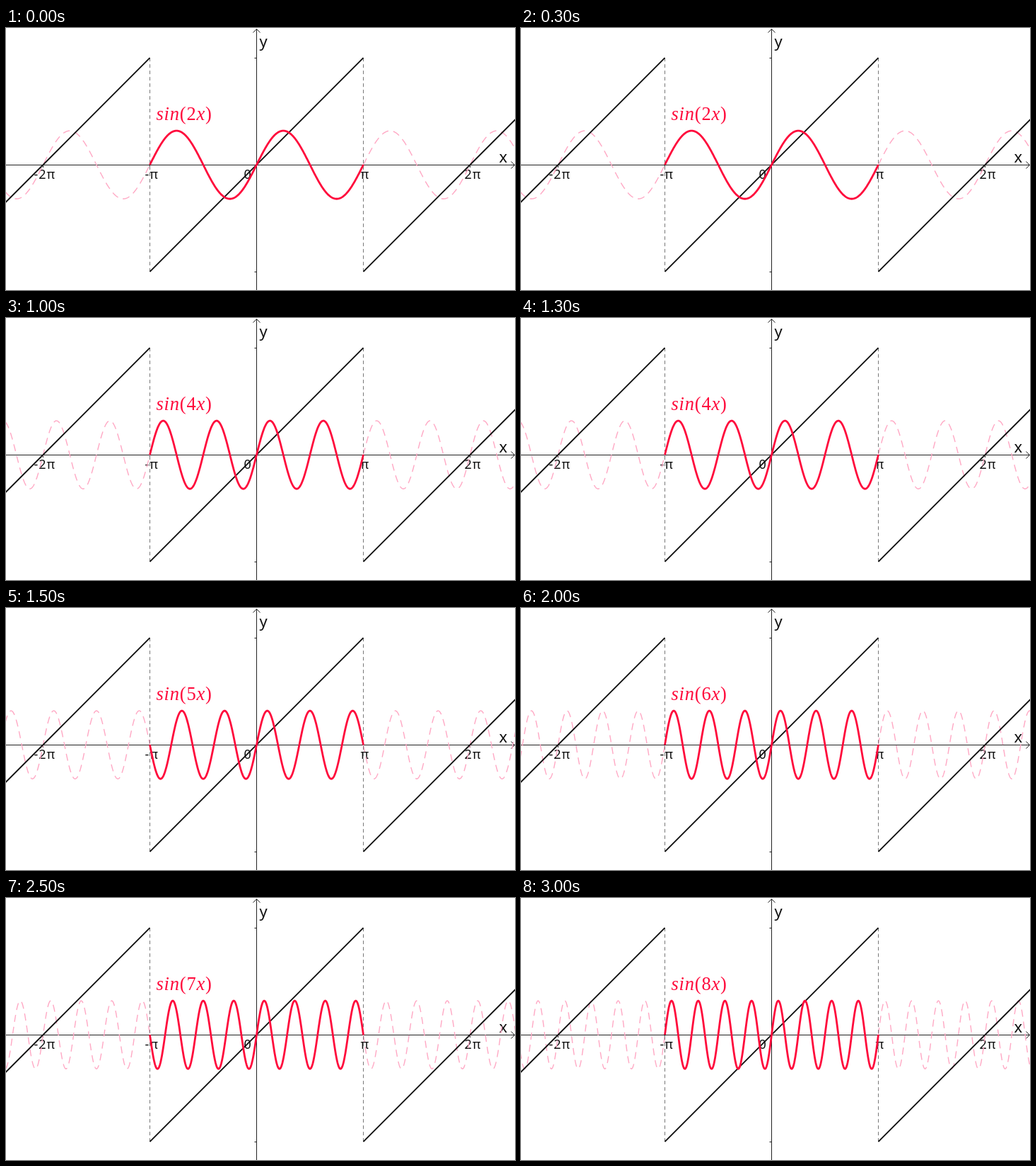
An HTML page with a canvas for the animation above (3500 ms loop, 720 px wide and 370 px high).

```html
<!DOCTYPE html>
<html lang="en">
<head>
<meta charset="utf-8">
<title>Sine harmonics on a sawtooth</title>
<style>
html, body { margin: 0; width: 100%; height: 100%; overflow: hidden; background: #fff; }
canvas { display: block; }
</style>
</head>
<body>
<canvas id="stage" width="720" height="370"></canvas>
<script>
const ctx = document.getElementById('stage').getContext('2d');
const W = 720, H = 370;
const OX = 354.5, OY = 193.2;   // origin
const HALF = 151;               // pixels per π
const UNIT = HALF / Math.PI;
const LEFT = OX - HALF, RIGHT = OX + HALF;
const RED = '#ff0a3c', PINK = '#ffa8c4';
const STEP_MS = 500, FIRST = 2, COUNT = 7;

function stroke(points, color, width, dash = []) {
  ctx.beginPath();
  points.forEach(([x, y]) => ctx.lineTo(x, y));
  ctx.strokeStyle = color;
  ctx.lineWidth = width;
  ctx.setLineDash(dash);
  ctx.stroke();
}

function label(text, x, y, font, color = '#111', spacing = 0) {
  ctx.font = font;
  ctx.fillStyle = color;
  ctx.letterSpacing = spacing + 'px';
  ctx.fillText(text, x, y);
  return x + ctx.measureText(text).width;
}

function drawAxes() {
  const ink = '#222';
  stroke([[0, 193.5], [719, 193.5]], ink, 1);
  stroke([[354.5, 2], [354.5, H]], ink, 1);
  stroke([[349.5, 6.5], [354.5, 1.5], [359.5, 6.5]], ink, 1);
  stroke([[714.5, 188.5], [719.5, 193.5], [714.5, 198.5]], ink, 1);
  for (const y of [42.5, 344.5]) stroke([[351.5, y], [354.5, y]], ink, 1);
  for (const k of [-2, -1, 1, 2]) {
    const x = OX + k * HALF;
    stroke([[x, 193.5], [x, 197]], ink, 1);
  }

  const small = '18px "Noto Sans", sans-serif';
  label('-2π', 39.5, 213, small, '#111', 1);
  label('-π', 196.5, 213, small, '#111', 1);
  label('0', 336.5, 213, small);
  label('π', 501.5, 213, small);
  label('2π', 648.5, 213, small, '#111', 1);
  const large = '22px "Noto Sans", sans-serif';
  label('y', 358.5, 26.5, large);
  label('x', 697.5, 190, large);
}

function drawSawtooth() {
  for (const x of [LEFT, RIGHT]) {
    stroke([[x, OY - HALF], [x, OY + HALF]], '#777', 1, [5, 4]);
  }
  for (const k of [-2, 0, 2]) {
    const x = OX + k * HALF;
    stroke([[x - HALF, OY + HALF], [x + HALF, OY - HALF]], '#111', 1.9);
  }
}

function drawSine(n, from, to, color, width, dash) {
  const points = [];
  for (let x = from; x <= to; x += 0.5) {
    points.push([x, OY - UNIT * Math.sin(n * (x - OX) / UNIT)]);
  }
  stroke(points, color, width, dash);
}

function drawFormula(n) {
  const upright = '26.5px "Liberation Serif", serif';
  const italic = 'italic ' + upright;
  let x = 212.5;
  for (const [text, font] of [['sin', italic], ['(' + n, upright], ['x', italic], [')', upright]]) {
    x = label(text, x, 130, font, RED, 0.8);
  }
}

function frame(now) {
  const n = FIRST + Math.floor(now / STEP_MS) % COUNT;
  ctx.fillStyle = '#fff';
  ctx.fillRect(0, 0, W, H);
  ctx.lineJoin = 'round';
  drawAxes();
  drawSine(n, -1, LEFT, PINK, 1.4, [10, 7]);
  drawSine(n, RIGHT, W + 1, PINK, 1.4, [10, 7]);
  drawSawtooth();
  drawSine(n, LEFT, RIGHT, RED, 2.8, []);
  drawFormula(n);
  requestAnimationFrame(frame);
}

frame(0);
</script>
</body>
</html>
```
